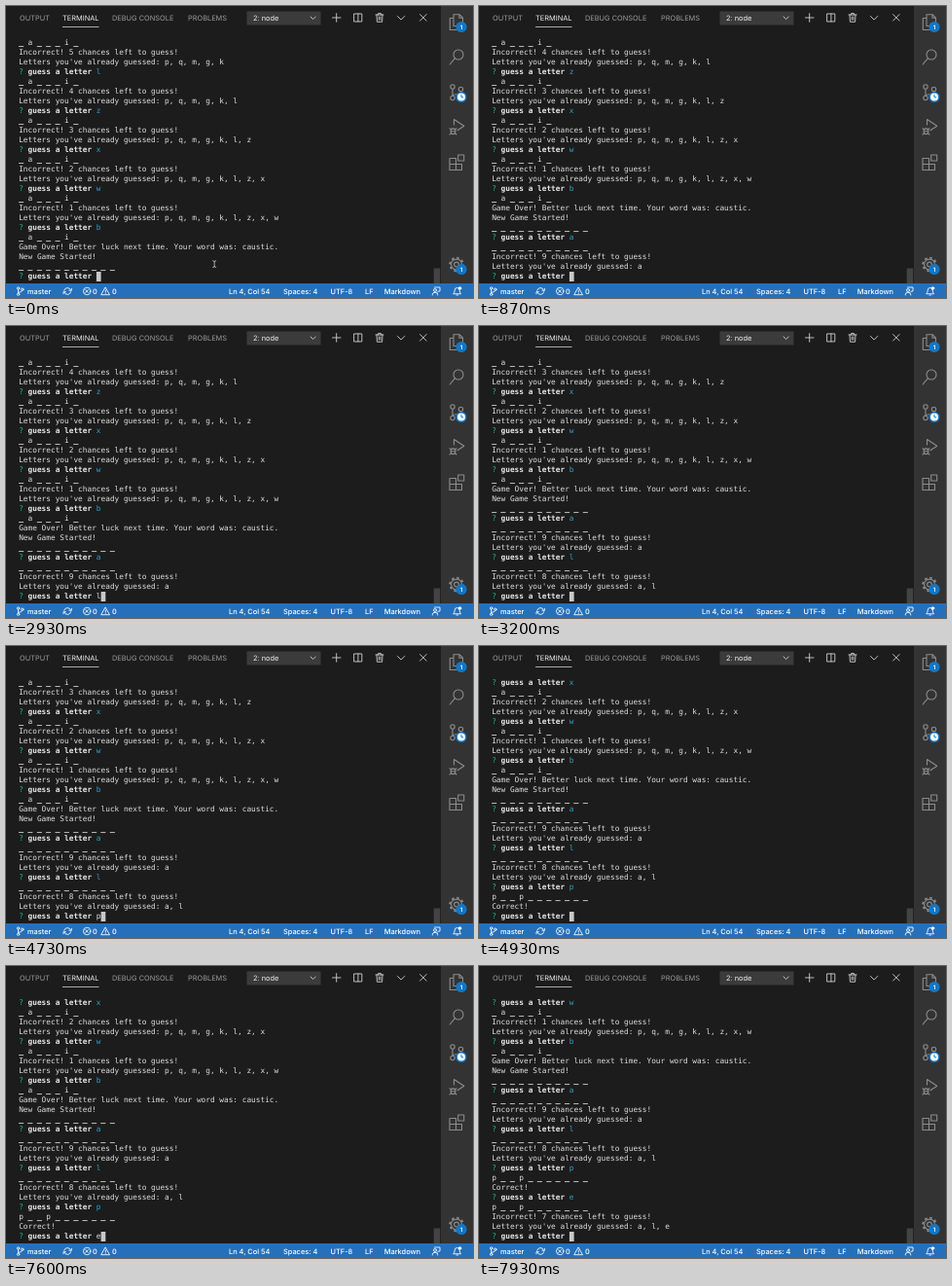
Write an HTML page that moves like this. It is 480 px wide and 300 px high and loops after 8 s.

```html
<!DOCTYPE html>
<html lang="en">
<head>
<meta charset="utf-8">
<title>Terminal guessing game</title>
<style>
  html, body { margin: 0; width: 100%; height: 100%; overflow: hidden; background: #1c1c1c; }
  svg { display: block; }
  text { white-space: pre; text-rendering: geometricPrecision; }
  .ui { font: 7.4px Inter, sans-serif; fill: #9a9a9a; }
  .ui .on { fill: #eee; }
  .bar { font: 500 7.4px Inter, sans-serif; fill: #fff; }
  .badge { font: 600 6px Inter, sans-serif; fill: #fff; text-anchor: middle; }
  #rows { font: 7.79px "DejaVu Sans Mono", monospace; fill: #dedede; }
  .mark { fill: #23b58b; }
  .ask { font-weight: bold; fill: #e6e6e6; }
  .key { fill: #2ba3c9; }
  .gap { stroke: #dedede; stroke-width: .45; }
  .line { fill: none; stroke-linecap: round; stroke-linejoin: round; }
</style>
</head>
<body>
<svg width="480" height="300" viewBox="0 0 480 300">
  <rect width="480" height="300" fill="#1c1c1c"/>

  <!-- panel tabs -->
  <rect x="247.500" y="5.500" width="76" height="14" fill="#3b3b3b"/>
  <g class="ui">
    <text x="14" y="14.8">OUTPUT</text>
    <text class="on" x="58" y="14.8">TERMINAL</text>
    <text x="109" y="14.8">DEBUG CONSOLE</text>
    <text x="187" y="14.8">PROBLEMS</text>
    <text class="on" x="254" y="14.8">2: node</text>
  </g>
  <path d="M58 21.5H95.500" stroke="#d0d0d0" stroke-width=".8"/>
  <g class="line" stroke="#d0d0d0" stroke-width=".9">
    <path d="M313 11l2.600 2.600 2.600-2.600"/>
    <path d="M335.500 12h8.500M339.700 7.700v8.600"/>
    <path d="M358 8h7.800v8H358zM361.900 8v8"/>
    <path d="M380 9h8M382.600 9V7.600h2.800V9M381 9l.4 7.300h5.200L387 9M383.200 11v3.300M384.900 11v3.300"/>
    <path d="M402.500 10.500l3.600 3.600 3.600-3.600"/>
    <path d="M425.500 8.600l6.600 6.600M432.100 8.600l-6.600 6.600"/>
  </g>

  <g id="rows"></g>
  <rect id="caret" y="273" width="4.700" height="10" fill="#c9c9c9"/>
  <path id="mouse" class="line" stroke="#c8c8c8" stroke-width=".8"
    d="M212.700 261.700q1.500 0 1.500 1.200 0-1.200 1.500-1.200M214.200 262.900v4.600M212.700 268.500q1.500 0 1.500-1.200 0 1.200 1.500 1.200"/>
  <rect x="439.700" y="269.500" width="6.500" height="15.500" fill="#434343"/>

  <!-- activity bar -->
  <rect x="447" width="33" height="285" fill="#333"/>
  <g class="line" stroke="#8c8c8c" stroke-width="1.100">
    <path d="M460 8.700h6l3.500 3.500v8.300H460zM466 8.700v3.500h3.500M460 12.500h-3.700v12h9v-4"/>
    <circle cx="465" cy="50" r="5"/>
    <path d="M461.400 53.700l-5.200 6.300"/>
    <circle cx="459" cy="83" r="2.200"/>
    <circle cx="467.500" cy="85.500" r="2.200"/>
    <circle cx="459" cy="94.500" r="2.200"/>
    <path d="M459 85.200v7.100M467.500 87.700q0 3-4 3t-4.500 1.600"/>
    <path d="M460.500 122v-5.500l10.300 6.800-6.800 4.500"/>
    <ellipse cx="459.500" cy="128.800" rx="2.300" ry="2.900"/>
    <path d="M457.200 128.800h4.600M456 125.800l1.700 1.200M456 132l1.700-1.200M463 125.800l-1.700 1.200M463 132l-1.700-1.200"/>
    <path d="M456 156.500h6.500v12H456zM456 162.500h12.500v6H456zM464.700 153h6v6h-6z"/>
    <circle cx="463" cy="265.500" r="2.400"/>
    <circle cx="463" cy="265.500" r="5.400"/>
    <circle cx="463" cy="265.500" r="6.800" stroke-width="1.800" stroke-linecap="butt" stroke-dasharray="2.670"/>
  </g>
  <g fill="#1177c8">
    <circle cx="468" cy="21.500" r="5.600"/>
    <circle cx="468" cy="93.500" r="5.600"/>
    <circle cx="468" cy="270.500" r="5.600"/>
  </g>
  <text class="badge" x="468" y="23.700">1</text>
  <text class="badge" x="468" y="272.700">1</text>
  <circle cx="468" cy="93.500" r="4" fill="#fff"/>
  <path class="line" d="M468 91.300v2.500h1.800" stroke="#1177c8" stroke-width="1"/>

  <!-- status bar -->
  <rect y="285" width="480" height="15" fill="#2670ba"/>
  <g class="line" stroke="#fff" stroke-width=".85">
    <circle cx="12.600" cy="290" r="1.200"/>
    <circle cx="12.600" cy="296.200" r="1.200"/>
    <circle cx="16.800" cy="291.200" r="1.200"/>
    <path d="M12.600 291.200v3.800M16.800 292.400q0 1.600-4.200 2"/>
    <path d="M59.700 292.300a3.600 3.600 0 0 1 6.800-.5M66.700 293.700a3.600 3.600 0 0 1-6.800.5M65 292.300h2.400v-2M61.400 293.700H59v2"/>
    <circle cx="83.200" cy="293" r="3.700"/>
    <path d="M81.700 291.500l3 3M84.700 291.500l-3 3"/>
    <path d="M102.300 289.300l4.200 7.400h-8.400zM102.300 292v2M102.300 295.300v.1"/>
    <circle cx="441" cy="292" r="1.500"/>
    <path d="M438.300 297v-.8q0-1.900 2.700-1.900t2.700 1.900v.8M440.500 289h5.500v4h-1.500l-1 1.200"/>
    <path d="M460 295.500q1.200-1 1.200-3.300 0-2.700 2.500-2.700t2.500 2.700q0 2.300 1.200 3.300zM463 297h1.400"/>
    <circle cx="466.500" cy="290" r="1.300" fill="#fff"/>
  </g>
  <g class="bar">
    <text x="22" y="295.700">master</text>
    <text x="89" y="295.700">0</text>
    <text x="109" y="295.700">0</text>
    <text x="229" y="295.700">Ln 4, Col 54</text>
    <text x="285" y="295.700">Spaces: 4</text>
    <text x="333.500" y="295.700">UTF-8</text>
    <text x="369" y="295.700">LF</text>
    <text x="388.700" y="295.700">Markdown</text>
  </g>
</svg>
<script>
const LOOP = 8000, LEFT = 13.2, CELL = 4.69, PITCH = 10, BASE = 280.4, ROWS = 25;
const $ = id => document.getElementById(id);

const span = (cls, text) => `<tspan class="${cls}">${text}</tspan>`;
const prompt = (key = '', cls = '') =>
  `${span('mark', '?')} ${span('ask', 'guess a letter')} ${span(cls, key)}`;
const blanks = Array(11).fill('_').join(' ');
const miss = (left, letters) => [
  `Incorrect! ${left} chances left to guess!`,
  `Letters you've already guessed: ${[...letters].join(', ')}`
];

// The lost game that is on screen at the start
const tried = 'pqmgklzxwb', lost = '_ a _ _ _ i _';
const history = [];
for (let left = 5; left; left--)
  history.push(lost, ...miss(left, tried.slice(0, 10 - left)), prompt(tried[10 - left], 'key'));
history.push(lost, 'Game Over! Better luck next time. Your word was: caustic.', 'New Game Started!', blanks);

const found = 'p _ _ p _ _ _ _ _ _ _';
const turns = [
  { key: 'a', type: 670, enter: 870, reply: [blanks, ...miss(9, 'a')] },
  { key: 'l', type: 2930, enter: 3200, reply: [blanks, ...miss(8, 'al')] },
  { key: 'p', type: 4670, enter: 4930, reply: [found, 'Correct!'] },
  { key: 'e', type: 7530, enter: 7870, reply: [found, ...miss(7, 'ale')] }
];

let shown = '';
function draw(t) {
  const lines = [...history];
  let typed = '';
  for (const { key, type, enter, reply } of turns) {
    if (t >= enter) lines.push(prompt(key, 'key'), ...reply);
    else if (t >= type) typed = key;
  }
  lines.push(prompt(typed));
  const html = lines.slice(-ROWS).map((line, i) => {
    const y = BASE - (ROWS - 1 - i) * PITCH;
    return `<text x="${LEFT}" y="${y}">${line.replace(/_/g, span('gap', '_'))}</text>`;
  }).join('');
  if (html !== shown) $('rows').innerHTML = shown = html;
  $('caret').setAttribute('x', LEFT + CELL * (17 + typed.length));
  $('mouse').style.display = t < turns[0].type ? '' : 'none';
}

const start = performance.now();
function tick() {
  draw((performance.now() - start) % LOOP);
  requestAnimationFrame(tick);
}
tick();
</script>
</body>
</html>
```
